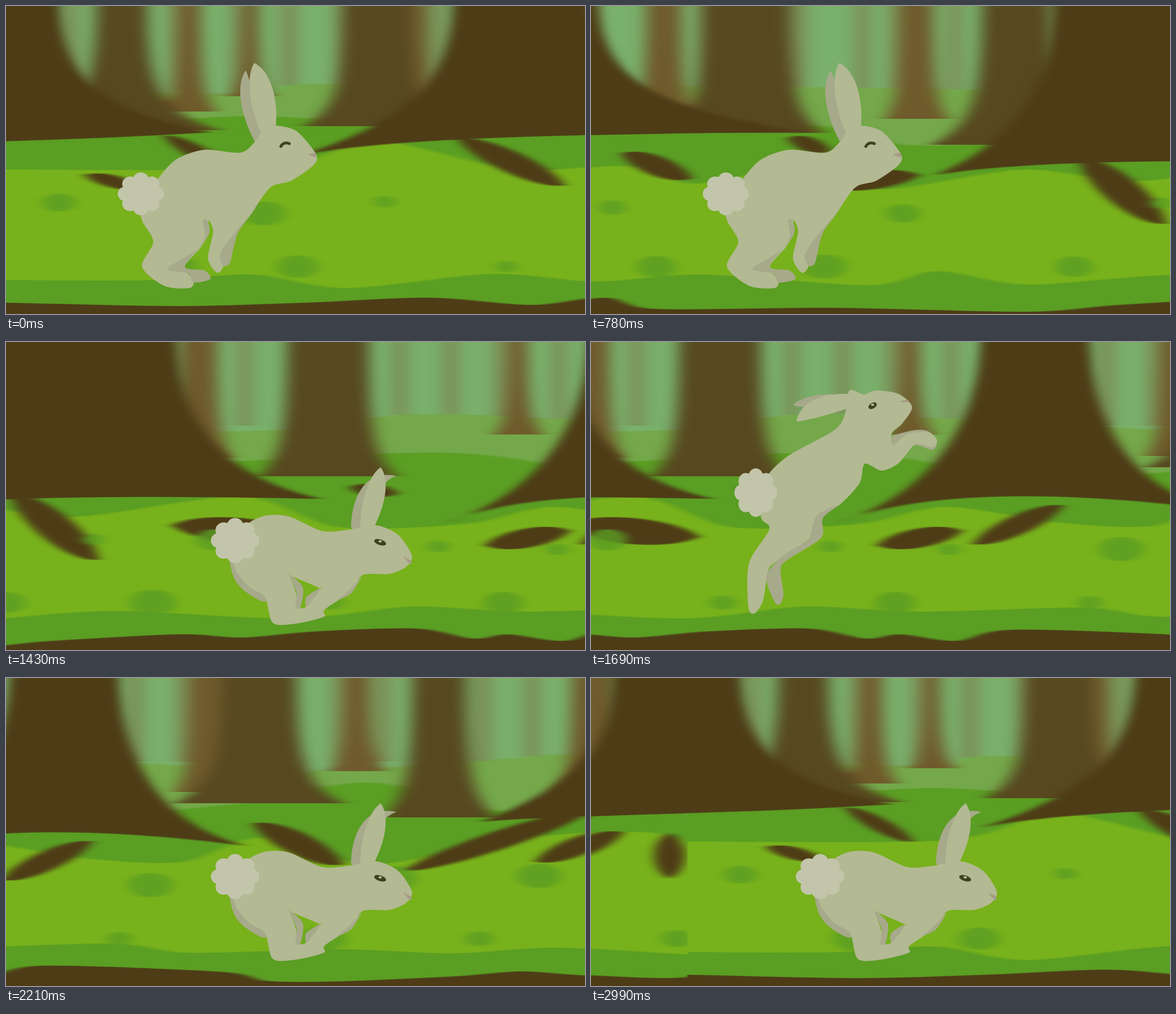
An HTML page that plays this animation: 1026x546 px, repeating every 3120 ms.

```html
<!DOCTYPE html>
<html lang="en">
<head>
<meta charset="utf-8">
<title>Running rabbit</title>
<style>
html, body { margin: 0; width: 100%; height: 100%; overflow: hidden; background: #4e3c17; }
svg { display: block; width: 1026px; height: 546px; }
</style>
</head>
<body>
<svg id="stage" viewBox="0 0 1026 546"></svg>
<script>
const WORLD = 4104, STEP_MS = 130, STEPS = 24;
const NEAR = '#4e3c17', MID = '#574820', BROWN = '#6f5a2b', FAR = '#7c8650', SKY = '#79b06b',
  PALE = '#74a84a', GREEN = '#5a9e23', BRIGHT = '#77b11b',
  FUR = '#b3b993', SHADE = '#a7a98b', TAIL = '#c2c5aa', EYE = '#3b421c', NOSE = '#a89a87';

let seed = 7;
const random = () => (seed = seed * 16807 % 2147483647) / 2147483647;
const many = (n, make) => Array.from({ length: n }, (_, i) => make(i)).join('');
const mix = (a, b, t) => a + (b - a) * t;

const path = (fill, d) => `<path fill="${fill}" fill-rule="evenodd" d="${d}"/>`;
const oval = (fill, x, y, rx, ry, extra = '') =>
  `<ellipse fill="${fill}" cx="${x}" cy="${y}" rx="${rx}" ry="${ry}" ${extra}/>`;

// Closed smooth curve through "x,y x,y ..."; a doubled point makes a corner.
function curve(text) {
  const p = text.trim().split(/\s+/).map(s => s.split(',').map(Number)), n = p.length;
  return 'M' + p[0] + p.map((b, i) => {
    const a = p[(i + n - 1) % n], c = p[(i + 1) % n], e = p[(i + 2) % n];
    return 'C' + [b.map((v, k) => v + (c[k] - a[k]) / 7), c.map((v, k) => v - (e[k] - b[k]) / 7), c].join(' ');
  }).join('') + 'Z';
}
// Several curves separated by "|" make one path with holes.
const shape = (fill, text) => path(fill, text.split('|').map(curve).join(''));
const shapes = (fill, list = []) => list.map(s => shape(fill, s)).join('');

// Everything below a wavy top line.
const ground = (fill, top) => shape(fill, `-90,${top.split(/[ ,]/)[1]} ${top} 4200,490 4200,600 4200,600 -90,600 -90,600`);

// Trunk whose sides flare out towards the ground.
const trunk = (fill, l, r, base, spread) => path(fill,
  `M${l},-20C${l},${base * .6} ${l - spread * .1},${base * .85} ${l - spread},${base}
   H${r + spread}C${r + spread * .1},${base * .85} ${r},${base * .6} ${r},-20Z`);

// Front tree: flares to a left and a right root tip, with soil bulging to y = mid between them.
const bigTree = (l, r, xl, yl, xr, yr, mid) => path(NEAR,
  `M${l},-20C${l},130 ${mix(l, xl, .28)},${yl - 62} ${xl},${yl}
   C${mix(xl, xr, .2)},${mid} ${mix(xl, xr, .6)},${mid} ${xr},${yr}
   C${mix(r, xr, .28)},${yr - 40} ${r},130 ${r},-20Z`);

// Lens from one tip to the other.
function root(x1, y1, x2, y2, w) {
  const len = Math.hypot(x2 - x1, y2 - y1), nx = (y1 - y2) / len * w, ny = (x2 - x1) / len * w;
  const side = s => [.2, .8].map(t => `${mix(x1, x2, t) + s * nx * .67},${mix(y1, y2, t) + s * ny * .67}`);
  return path(NEAR, `M${x1},${y1}C${side(1)} ${x2},${y2}C${side(-1).reverse()} ${x1},${y1}Z`);
}

const brownTrunks = [[305, 345, 187], [420, 447, 160], [712, 748, 190], [1124, 1186, 192], [1574, 1632, 200],
  [2190, 2255, 205], [2773, 2805, 164], [3233, 3290, 202], [3507, 3552, 165], [3909, 3975, 198]];
const midTrunks = [[160, 250, 220, 130], [597, 716, 213, 70], [1224, 1379, 225, 60], [1719, 1840, 246, 90],
  [2379, 2524, 238, 50], [3290, 3422, 222, 85], [3627, 3722, 247, 55]];
const bigTrees = [[-133, 95, -355, 255, 360, 224, 242], [792, 1039, 518, 266, 1400, 222, 229],
  [1846, 2184, 1635, 300, 2440, 278, 272], [2913, 3107, 2660, 322, 3335, 298, 262]];
const roots = [[280, 230, 400, 290, 26], [140, 300, 240, 322, 22], [800, 235, 990, 318, 40], [1080, 262, 1205, 305, 36],
  [1375, 235, 1450, 256, 26], [1420, 318, 1608, 300, 34], [1890, 270, 2045, 386, 54], [2175, 325, 2415, 345, 46],
  [2490, 258, 2575, 268, 22], [2730, 360, 2880, 335, 34], [3060, 290, 2900, 358, 36], [3345, 258, 3505, 330, 42],
  [3610, 343, 3950, 232, 34], [3845, 325, 3990, 274, 34], [4072, 274, 4072, 356, 54]];

const forest = path(SKY, 'M-90,-30H4200V600H-90Z')
  + many(46, i => `<rect fill="${FAR}" x="${(i + random() * .5) * 91}" y="-30" width="${22 + random() * 10}" height="178" opacity=".85"/>`)
  + ground(PALE, '0,150 450,155 560,138 1500,145 2300,158 2600,128 2900,138 3450,165 3700,150 4104,155')
  + brownTrunks.map(t => trunk(BROWN, ...t, 28)).join('')
  + ground(GREEN, '0,235 430,195 900,230 1400,210 1600,247 2000,230 2650,196 3000,240 3300,225 3550,185 3780,235 4104,238')
  + midTrunks.map(t => trunk(MID, ...t)).join('');

const trees = bigTrees.map(t => bigTree(...t)).join('');
const floor = ground(BRIGHT, '0,290 400,290 520,278 665,240 900,290 1090,284 1210,315 1400,285 1540,325 1790,290 2000,310 2300,274 2470,328 2700,322 2850,292 3050,320 3220,326 3360,283 3560,330 3830,282 4104,290')
  + trees + `<g transform="translate(${WORLD})">${bigTree(...bigTrees[0])}</g>`
  + roots.map(r => root(...r)).join('')
  + many(26, i => {
    const rx = 18 + random() * 24;
    return oval(GREEN, (i + random()) * WORLD / 26, i % 2 ? 462 : 345 + random() * 25, rx, rx * .55, 'opacity=".8"');
  })
  + ground(GREEN, '0,486 260,486 440,476 600,500 860,475 1040,488 1224,476 1520,495 1640,470 1800,494 2060,477 2390,490 2600,469 2800,478 3100,471 3230,487 3500,481 3700,488 3880,478 4104,490')
  + ground(NEAR, '0,526 300,532 530,526 750,517 930,530 1054,517 1140,537 1450,535 1800,542 1960,530 2190,518 2300,524 2430,513 2610,508 2710,526 2770,518 2870,530 2970,510 3290,521 3370,537 3490,538 3700,529 3820,520 3930,527 4104,530');

// Ear from base to tip; bend pushes its middle sideways.
function ear(fill, x1, y1, x2, y2, w, bend) {
  const len = Math.hypot(x2 - x1, y2 - y1), nx = (y1 - y2) / len, ny = (x2 - x1) / len;
  const at = (t, off) => `${mix(x1, x2, t) + nx * off},${mix(y1, y2, t) + ny * off}`;
  return path(fill, `M${at(0, w * .3)}C${at(.45, bend + w * .65)} ${at(.85, bend + w * .5)} ${x2},${y2}
    C${at(.85, bend - w * .5)} ${at(.45, bend - w * .65)} ${at(0, -w * .3)}Z`);
}

// ears: near, far; back: behind the body; front: shading on it; eye: x, y, rx, ry, tilt
const poses = [
  { // push off
    tail: [239, 333, 41, 38], ears: [[465, 224, 440, 101, 43, 3], [450, 242, 425, 114, 26, -9]],
    body: `440,242 415,260 350,255 300,273 266,310 238,345 241,380 261,418 241,462 280,496 325,500 332,486 316,463
      345,428 358,405 359,380 367,400 358,448 374,473 386,460 386,432 430,375 468,322 505,310 545,282 549,262
      515,222 478,212 458,218`,
    front: ['286,466 335,434 352,410 349,380 358,382 358,408 317,461 352,469 362,484 333,490 322,474',
      '443,358 411,402 397,455 385,460 379,442 395,415'],
    nose: '536,263 548,261 549,268 541,266'
  },
  { // leap
    tail: [292, 267, 38, 43], ears: [[468, 102, 364, 141, 34, 12], [465, 102, 358, 112, 22, 4]],
    back: ['530,178 536,166 575,156 597,158 613,173 606,191 575,183 540,192'],
    body: `458,86 483,93 505,86 545,92 569,115 552,144 533,162 535,183 562,163 597,160 613,174 605,187 575,181
      545,215 515,228 485,216 476,250 440,289 400,310 388,347 330,388 314,405 305,458 290,481 279,470 280,392
      316,332 301,310 305,250 345,205 430,157 450,128`,
    front: ['441,288 411,312 408,347 350,385 336,402 341,450 330,466 314,435 313,408 345,375 385,350 400,308'],
    eye: [499, 113, 8, 5, -30], nose: '548,105 560,103 563,106 555,107'
  },
  { // flight
    tail: [366, 203, 42, 39], ears: [[608, 150, 562, 79, 26, 5], [605, 152, 537, 103, 22, 0]],
    back: ['600,240 652,292 664,286 625,230', '445,240 362,302 340,328 390,300 450,255'],
    body: `420,165 490,155 575,157 605,132 645,138 685,177 665,200 622,212 640,235 690,266 670,277 595,246 520,250
      430,242 360,287 300,322 292,312 335,265 365,225 380,185`,
    eye: [645, 163, 8, 7, 0], nose: '672,178 684,177 683,184'
  },
  { // descent
    tail: [472, 147, 46, 38], ears: [[691, 242, 660, 135, 37, 8], [695, 240, 638, 160, 40, 32]],
    body: `480,148 530,156 583,188 640,223 678,233 710,243 733,272 736,330 728,347 700,346 645,325 633,313 627,348
      672,373 668,387 610,368 588,306 545,296 505,270 438,264 460,290 452,296 415,270 383,240 398,223 438,219
      436,190 460,160`,
    front: ['590,308 603,385 612,408 645,416 653,404 629,388 602,345', '632,313 637,320 630,347 627,340',
      '429,258 490,264 507,243 520,280 505,270 468,274 479,300 468,302 442,272'],
    eye: [700, 277, 8, 7, 10], nose: '726,325 731,335 727,346 725,336'
  },
  { // landing
    tail: [567, 247, 48, 38], ears: [[810, 345, 801, 217, 38, -1], [795, 334, 776, 221, 28, -4]],
    body: `590,240 640,248 690,300 750,329 795,328 826,343 847,368 847,425 837,440 790,430 757,408 690,437 643,463
      651,490 630,487 606,465 651,412 632,398 590,415 587,437 565,445 515,420 486,395 492,384 530,365 538,348
      523,300 530,270`,
    front: ['727,420 665,445 642,460 655,485 668,478 668,456 700,436',
      '547,404 622,391 632,399 594,417 598,438 588,440 580,418'],
    eye: [811, 371, 9, 10, 0], nose: '832,430 834,427 837,438 832,440'
  },
  { // gather
    tail: [406, 352, 43, 40], ears: [[638, 332, 664, 222, 36, 2], [618, 334, 692, 238, 28, -30]],
    back: ['397,385 405,420 425,443 459,460 470,430 420,390'],
    body: `420,332 455,309 500,309 560,335 605,333 656,325 695,342 719,378 710,398 680,411 632,413 612,442 565,474
      563,487 515,499 473,498 459,452 430,433 404,395 | 503,414 503,414 530,425 557,437 557,437 531,470 515,468 515,450`,
    front: ['503,414 526,435 522,470 513,470 515,445', '557,437 541,460 532,469 532,452',
      '630,416 612,445 588,457 610,438'],
    eye: [663, 355, 11, 5, 18], nose: '705,381 718,388 716,394'
  }];

const tail = ([x, y, rx, ry]) => oval(TAIL, x, y, rx * .84, ry * .84) + many(8, i => {
  const a = i * Math.PI / 4;
  return oval(TAIL, x + Math.cos(a) * rx * .66, y + Math.sin(a) * ry * .66, rx * .34, ry * .34);
});
function eye(e) {
  if (!e) return `<path d="M487,249q5,-9 15,-5" fill="none" stroke="${EYE}" stroke-width="5" stroke-linecap="round"/>`;
  const [x, y, rx, ry, tilt] = e;
  return oval(EYE, x, y, rx, ry, `transform="rotate(${tilt} ${x} ${y})"`) + oval(FUR, x, y - ry * .35, 3, 2);
}
const rabbit = p => `<g class="pose">${ear(SHADE, ...p.ears[1])}${shapes(SHADE, p.back)}${ear(FUR, ...p.ears[0])}`
  + `${shape(FUR, p.body)}${shapes(SHADE, p.front)}${tail(p.tail)}${shape(NOSE, p.nose)}${eye(p.eye)}</g>`;

const blur = (id, size) => `<filter id="${id}" filterUnits="userSpaceOnUse" x="-80" y="-30" width="4270" height="620"
  color-interpolation-filters="sRGB"><feGaussianBlur stdDeviation="${size} .7"/></filter>`;
const stage = document.getElementById('stage');
stage.innerHTML = `<defs>${blur('far', 14)}${blur('close', 10)}
  <clipPath id="edge"><rect width="${WORLD}" height="546"/></clipPath>
  <g id="strip" clip-path="url(#edge)"><g filter="url(#far)">${forest}</g><g filter="url(#close)">${floor}</g></g></defs>
  <g id="scroll"><use href="#strip"/><use href="#strip" x="${WORLD}"/></g>` + poses.map(rabbit).join('');

const scroll = document.getElementById('scroll'), figures = [...stage.querySelectorAll('.pose')];
function draw() {
  const step = Math.floor(performance.now() / STEP_MS) % STEPS;
  scroll.setAttribute('transform', `translate(${-step * WORLD / STEPS} 0)`);
  figures.forEach((g, i) => g.style.display = i === step % poses.length ? '' : 'none');
  requestAnimationFrame(draw);
}
draw();
</script>
</body>
</html>
```
